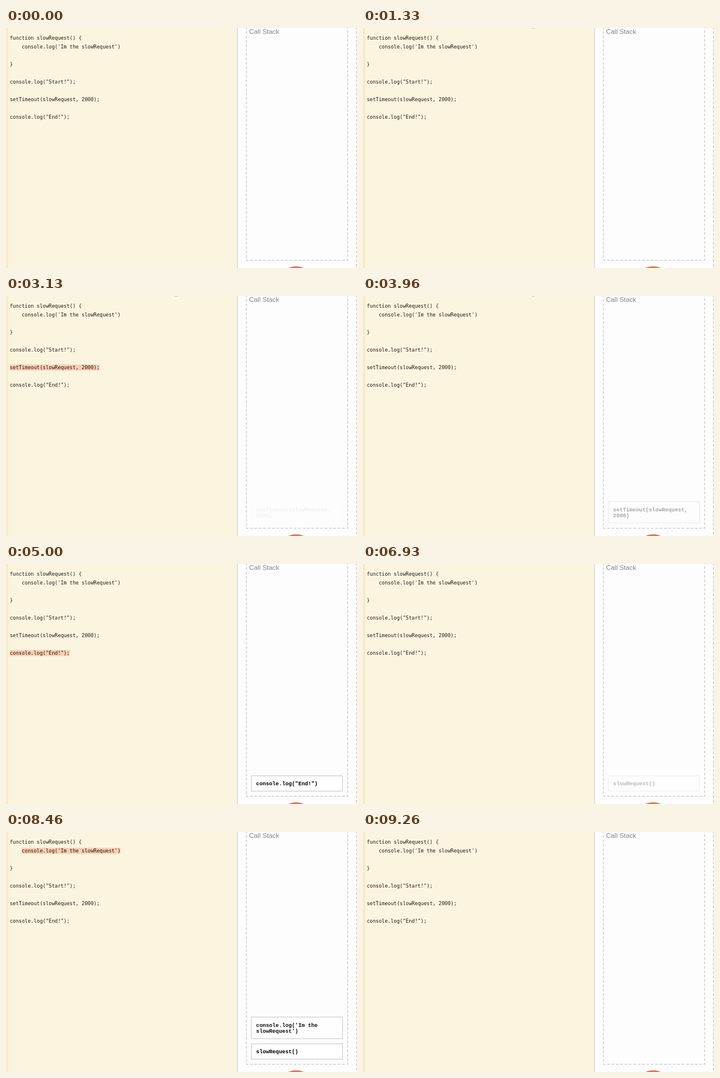
An HTML page that plays this animation: 600 by 410 pixels, repeating every 9760 ms.

```html
<!DOCTYPE html>
<html lang="en">
<head>
<meta charset="utf-8">
<title>Call stack</title>
<style>
  html, body { margin: 0; width: 100%; height: 100%; overflow: hidden; background: #fdfdfd; }
  svg { display: block; }
  text { white-space: pre; }
  .code { font: 8.51px "DejaVu Sans Mono", monospace; fill: #1c1b18; }
  .frame text { font: bold 9.24px "Liberation Mono", monospace; fill: #000; }
  .frame rect { fill: #fff; stroke: #d9d9d9; stroke-width: 1.6; }
  .dashed { fill: none; stroke: #cfcfcf; stroke-width: 1.5; stroke-dasharray: 4.5 3; }
  .title { font: 11.45px "Liberation Sans", sans-serif; fill: #858585; }
</style>
</head>
<body>
<svg id="stage" width="600" height="410" viewBox="0 0 600 410">
  <rect width="395" height="410" fill="#fbf4df"/>
  <rect width="3.7" height="410" fill="#f8eac4"/>
  <rect x="395" width="1.4" height="410" fill="#d8d8d6"/>
  <ellipse id="spot" cx="291" cy="-1" rx="3.5" ry="2" fill="#c9c4b6"/>
  <path class="dashed" d="M411 -2V396.8H584V-2M599.3 -2V410"/>
  <text class="title" x="415.5" y="10">Call Stack</text>
  <circle cx="496" cy="439" r="32" fill="#f26f58"/>
</svg>
<script>
const LOOP = 9760, CHAR = 5.123, LINE = 15;
const stage = document.getElementById('stage');
const spot = document.getElementById('spot');

const source = [
  'function slowRequest() {',
  "    console.log('Im the slowRequest')",
  '',
  '}',
  '',
  'console.log("Start!");',
  '',
  'setTimeout(slowRequest, 2000);',
  '',
  'console.log("End!");'
];

// enter and leave are [start, end] of each fade; line is the highlighted source line
const calls = [
  { text: ['console.log("Start!")'], line: 5, bottom: 388, enter: [1600, 2130], leave: [2300, 2500] },
  { text: ['setTimeout(slowRequest,', '2000)'], line: 7, bottom: 388, enter: [3128, 3270], leave: [3660, 4030] },
  { text: ['console.log("End!")'], line: 9, bottom: 388, enter: [4630, 5000], leave: [5200, 5530] },
  { text: ['slowRequest()'], bottom: 388, enter: [6870, 7300], shown: 6930, leave: [9150, 9260] },
  { text: ["console.log('Im the", "slowRequest')"], line: 1, bottom: 353, enter: [7530, 8130], leave: [8400, 8660] }
];

function add(parent, tag, attrs, text = '') {
  const node = document.createElementNS('http://www.w3.org/2000/svg', tag);
  for (const key in attrs) node.setAttribute(key, attrs[key]);
  node.textContent = text;
  return parent.appendChild(node);
}

function addHighlight(line) {
  const code = source[line], indent = code.search(/\S/);
  return add(stage, 'rect', {
    x: 6.3 + indent * CHAR, y: 12 + line * LINE,
    width: (code.length - indent) * CHAR, height: 10.3, fill: '#f8ceb3'
  });
}

function addFrame({ text, bottom }) {
  const frame = add(stage, 'g', { class: 'frame' });
  const height = 15.5 + text.length * 10.7;
  add(frame, 'rect', { x: 419.5, y: bottom - height, width: 155.7, height });
  text.forEach((row, i) => add(frame, 'text', {
    x: 427.6, y: bottom - 9.8 - (text.length - 1 - i) * 10.7
  }, row));
  return frame;
}

for (const call of calls) {
  if (call.line !== undefined) call.highlight = addHighlight(call.line);
  call.frame = addFrame(call);
}
source.forEach((row, i) => add(stage, 'text', { class: 'code', x: 6.5, y: 20.2 + i * LINE }, row));

const progress = (t, [start, end]) => Math.min(1, Math.max(0, (t - start) / (end - start)));
const show = (node, visible) => node.setAttribute('visibility', visible ? 'visible' : 'hidden');

function draw(now) {
  const t = now % LOOP;
  show(spot, t >= 260 && t < 4630);
  for (const { frame, highlight, enter, leave, shown = enter[0] } of calls) {
    const fadeIn = 1 - (1 - progress(t, enter)) ** 2;
    const fadeOut = 1 - progress(t, leave) ** 2;
    frame.setAttribute('opacity', t < shown ? 0 : fadeIn * fadeOut);
    if (highlight) show(highlight, t >= enter[0] && t < leave[0] + 66);
  }
  requestAnimationFrame(() => draw(performance.now()));
}
draw(performance.now());
</script>
</body>
</html>
```
